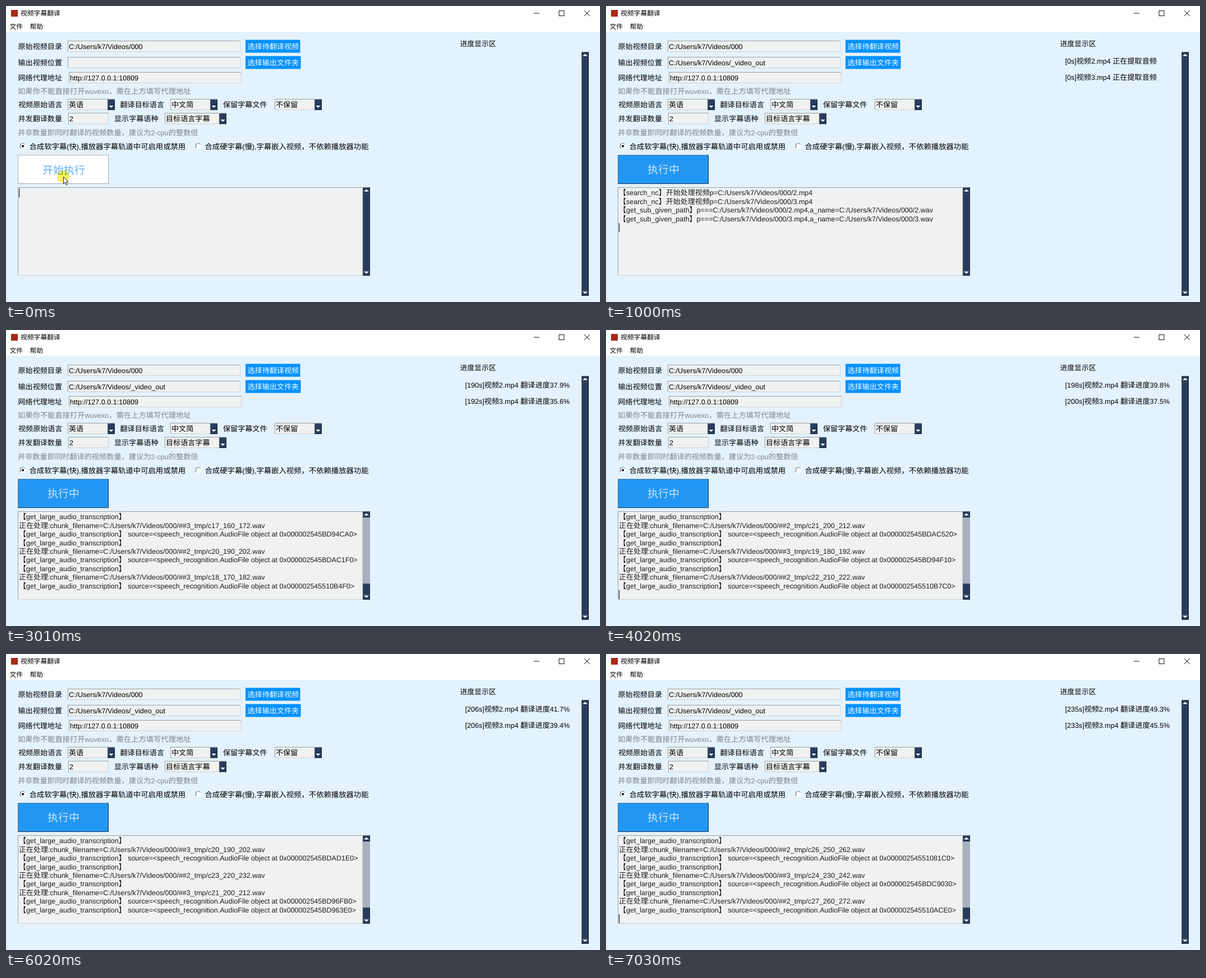
An HTML page with a canvas that plays this animation: 1059x529 px, repeating every 8000 ms.

```html
<!DOCTYPE html>
<html lang="zh-CN">
<head>
<meta charset="utf-8">
<title>视频字幕翻译</title>
<style>
html, body { margin: 0; width: 100%; height: 100%; overflow: hidden; background: #e3f2fd; }
canvas { display: block; }
</style>
</head>
<body>
<canvas id="stage" width="1059" height="529"></canvas>
<script>
const ctx = document.getElementById('stage').getContext('2d');
const LATIN = '"Liberation Sans", Arial, sans-serif';
const HAN = '"Noto Sans CJK SC", "Noto Sans CJK", sans-serif';
const NAVY = '#283b5b', BLUE = '#2196f3', FIELD = '#f0f1f1', GREY = '#808488';
const LOOP = 8000;

const videos = 'C:/Users/k7/Videos/';
const dir = videos + '000/';
const big = '【get_large_audio_transcription】';
const sub = '【get_sub_given_path】';

const begin = v => `【search_nc】开始处理视频p=${dir}${v}.mp4`;
const extract = v => `${sub}p===${dir}${v}.mp4,a_name=${dir}${v}.wav`;
const voice = v => [`${big}生成语言文件:nonslient_file='${dir}##${v}_tmp/detected_vo`, "ice.json'",
  `${big}正在创建语音切分标识文件...`];
const chunk = (v, n) => [big,
  `正在处理:chunk_filename=${dir}##${v}_tmp/c${n}_${n * 10 - 10}_${n * 10 + 2}.wav`];
const audio = id => `${big} source=<speech_recognition.AudioFile object at 0x000002545${id}>`;
const status = (v, sec, what) => `[${sec}s]视频${v}.mp4 ${what}`;
const percent = (v, sec, p) => status(v, sec, '翻译进度' + p + '%');

const later = {
  log: [...chunk(3, 20), audio('BDAD1E0'), ...chunk(2, 23), ...chunk(3, 21),
    audio('BD96FB0'), audio('BD963E0')],
  jobs: [percent(2, 206, 41.7), percent(3, 206, 39.4)], scrolled: true
};
const scenes = [
  { at: 0, idle: true, log: [], jobs: [], caret: 0 },
  { at: 1000, log: [begin(2), begin(3), extract(2), extract(3)],
    jobs: [status(2, 0, '正在提取音频'), status(3, 0, '正在提取音频')], caret: 4 },
  { at: 2010, log: [...voice(2), `${sub} 音频文件 a_name=${dir}3.wav已提取.`,
      `${big}待处理音频 audio_name='3',tmp_path='${dir}##3_tmp'`,
      `${big}length of audio_segment=506.984 seconds`, ...voice(3)],
    jobs: [status(2, 5, '正在创建语音切分'), status(3, 6, '正在创建语音切分')] },
  { at: 3010, log: [...chunk(3, 17), audio('BD94CA0'), ...chunk(2, 20), audio('BDAC1F0'),
      ...chunk(3, 18), audio('510B4F0')],
    jobs: [percent(2, 190, 37.9), percent(3, 192, 35.6)], scrolled: true },
  { at: 4020, log: [...chunk(2, 21), audio('BDAC520'), ...chunk(3, 19), audio('BD94F10'),
      ...chunk(2, 22), audio('510B7C0')],
    jobs: [percent(2, 198, 39.8), percent(3, 200, 37.5)], scrolled: true, caret: 9 },
  { ...later, at: 5020, caret: 9 },
  { ...later, at: 6020 },
  { at: 7030, log: [...chunk(2, 26), audio('51081C0'), ...chunk(3, 24), audio('BDC9030'),
      ...chunk(2, 27), audio('510ACE0')],
    jobs: [percent(2, 235, 49.3), percent(3, 233, 45.5)], scrolled: true, caret: 9 }
];

function rect(x, y, w, h, color) {
  ctx.fillStyle = color;
  ctx.fillRect(x, y, w, h);
}

// Mixed text: Han and Latin runs each use their own face; cy is the line's middle.
function text(str, x, cy, color = '#000', han = 13.1, latin = 12.55, weight = 400) {
  ctx.fillStyle = color;
  for (const run of str.match(/[\u3000-\uffef]+|[^\u3000-\uffef]+/g)) {
    ctx.font = run[0] >= '\u3000' ? `${weight} ${han}px ${HAN}` : `${latin}px ${LATIN}`;
    ctx.fillText(run, x, Math.round(cy + han * 0.36));
    x += ctx.measureText(run).width;
  }
}

function bevel(x, y, w, h, fill, light, dark) {
  rect(x, y, w, h, dark);
  rect(x, y, w - 1, h - 1, light);
  rect(x + 1, y + 1, w - 2, h - 2, fill);
}

const sunken = (x, y, w, h) => bevel(x, y, w, h, FIELD, '#9a9ea1', '#ccd2d6');
const raised = (x, y, w, h) => bevel(x, y, w, h, NAVY, '#4c5d79', '#1a263b');

// Triangle centred on (x, y); dir is -1 for up, 1 for down.
function arrow(x, y, half, dir) {
  ctx.fillStyle = '#fff';
  ctx.beginPath();
  ctx.moveTo(x - half, y - 2 * dir);
  ctx.lineTo(x + half, y - 2 * dir);
  ctx.lineTo(x, y + 2 * dir);
  ctx.fill();
}

function entry(x, y, w, h, value) {
  sunken(x, y, w, h);
  if (value) text(value, x + 2, y + h / 2);
}

function combo(x, y, w, h, value) {
  entry(x, y, w, h, value);
  raised(x + w - 13, y + 1, 13, h - 1);
  arrow(x + w - 6.5, y + 14, 4, 1);
}

function scrollbar(x, y, h, thumbY, thumbH) {
  rect(x, y, 13, h, '#a6b2be');
  raised(x, y, 13, 11);
  arrow(x + 6.5, y + 5.5, 4.5, -1);
  raised(x, thumbY, 13, thumbH);
  raised(x, y + h - 11, 13, 11);
  arrow(x + 6.5, y + h - 5.5, 4.5, 1);
}

function radio(x, y, on) {
  ctx.fillStyle = '#fff';
  ctx.beginPath();
  ctx.arc(x, y, 5.5, 0, 7);
  ctx.fill();
  ctx.lineWidth = 1.2;
  ctx.strokeStyle = '#70757a';
  ctx.beginPath();
  ctx.arc(x, y, 5, Math.PI * 0.75, Math.PI * 1.75);
  ctx.stroke();
  if (!on) return;
  ctx.fillStyle = '#000';
  ctx.beginPath();
  ctx.arc(x, y, 2.1, 0, 7);
  ctx.fill();
}

function titleBar() {
  rect(0, 0, 1059, 46, '#fff');
  rect(9, 7, 12, 12, '#a52a16');
  text('视频字幕翻译', 26, 13, '#000', 11.8);
  text('文件', 6.5, 37, '#000', 11.8);
  text('帮助', 42.5, 37, '#000', 11.8);
  ctx.strokeStyle = '#111';
  ctx.lineWidth = 1;
  ctx.strokeRect(986, 8.5, 9, 9);
  ctx.beginPath();
  ctx.moveTo(941, 13);
  ctx.lineTo(951, 13);
  ctx.moveTo(1031, 8);
  ctx.lineTo(1041, 18);
  ctx.moveTo(1041, 8);
  ctx.lineTo(1031, 18);
  ctx.stroke();
}

function form(scene) {
  text('原始视频目录', 21.5, 72);
  entry(110, 62, 308, 20, videos + '000');
  rect(427, 60.5, 97.5, 23, '#0091ff');
  text('选择待翻译视频', 430.5, 72, '#fff');

  text('输出视频位置', 21.5, 101);
  entry(110, 91, 308, 20, scene.idle ? '' : videos + '_video_out');
  rect(427, 89.5, 98.5, 23, '#0091ff');
  text('选择输出文件夹', 430.5, 101, '#fff');

  text('网络代理地址', 21.5, 128);
  entry(112, 118, 308, 20, 'http://127.0.0.1:10809');
  text('如果你不能直接打开wuvexo，需在上方填写代理地址', 21, 152, GREY, 13.3);

  text('视频原始语言', 22, 176);
  combo(110, 166, 84, 20, '英语');
  text('翻译目标语言', 203.5, 176);
  combo(293, 166, 84, 20, '中文简');
  text('保留字幕文件', 387, 176);
  combo(479, 166, 84, 20, '不保留');

  text('并发翻译数量', 21.5, 201);
  entry(111, 191, 72, 20, '2');
  text('显示字幕语种', 193, 201);
  combo(283, 191, 110, 20, '目标语言字幕');
  text('并非数量即同时翻译的视频数量，建议为2-cpu的整数倍', 21, 226, GREY, 13.2);

  radio(30, 250.5, true);
  text('合成软字幕(快),播放器字幕轨道中可启用或禁用', 41.5, 251, '#000', 13.35);
  radio(343, 250.5, false);
  text('合成硬字幕(慢),字幕嵌入视频，不依赖播放器功能', 354.5, 251, '#000', 13.35);
}

function startButton(idle) {
  if (idle) {
    bevel(21, 266, 162, 52, '#fff', '#b4b8bb', '#a5a9ac');
    text('开始执行', 65, 293, '#5fb3f6', 19, 19, 300);
  } else {
    bevel(21, 266, 162, 52, BLUE, '#55799a', '#16324c');
    text('执行中', 74, 292, '#d0e8fc', 19, 19, 300);
  }
}

function logBox(scene) {
  sunken(21, 324, 615, 158);
  scene.log.forEach((line, i) => text(line, 23, 333.8 + 15.4 * i, '#1c1c1c', 13, 12.5));
  if (scene.caret !== undefined) rect(23, Math.round(326 + 15.4 * scene.caret), 1, 16, '#000');
  if (scene.scrolled) scrollbar(636, 324, 158, 453, 18);
  else scrollbar(636, 324, 158, 335, 136);
}

function progress(scene) {
  text('进度显示区', 809.5, 67, '#000', 12.8);
  ctx.save();
  ctx.beginPath();
  ctx.rect(815, 85, scene.scrolled ? 200 : 169.5, 60);
  ctx.clip();
  scene.jobs.forEach((job, i) => text(job, 818.5, 98 + 29 * i));
  ctx.restore();
  scrollbar(1026, 82, 436, 93, 414);
}

function pointer(x, y) {
  ctx.globalCompositeOperation = 'multiply';
  ctx.fillStyle = '#fcf05c';
  ctx.beginPath();
  ctx.arc(x, y, 11, 0, 7);
  ctx.fill();
  ctx.globalCompositeOperation = 'source-over';
  ctx.save();
  ctx.translate(x + 0.5, y + 0.5);
  const tip = new Path2D('M0 0V12L2.8 9.4L5 14.2L7 13.3L4.9 8.7H8.6Z');
  ctx.fillStyle = '#fff';
  ctx.fill(tip);
  ctx.strokeStyle = '#222';
  ctx.lineWidth = 1;
  ctx.stroke(tip);
  ctx.restore();
}

function draw(scene) {
  ctx.textRendering = 'geometricPrecision';
  rect(0, 0, 1059, 529, '#e3f2fd');
  titleBar();
  form(scene);
  startButton(scene.idle);
  logBox(scene);
  progress(scene);
  if (scene.idle) pointer(102, 305);
}

const start = performance.now();
function tick() {
  const t = (performance.now() - start) % LOOP;
  draw(scenes.filter(s => s.at <= t).pop());
  requestAnimationFrame(tick);
}
tick();
</script>
</body>
</html>
```
